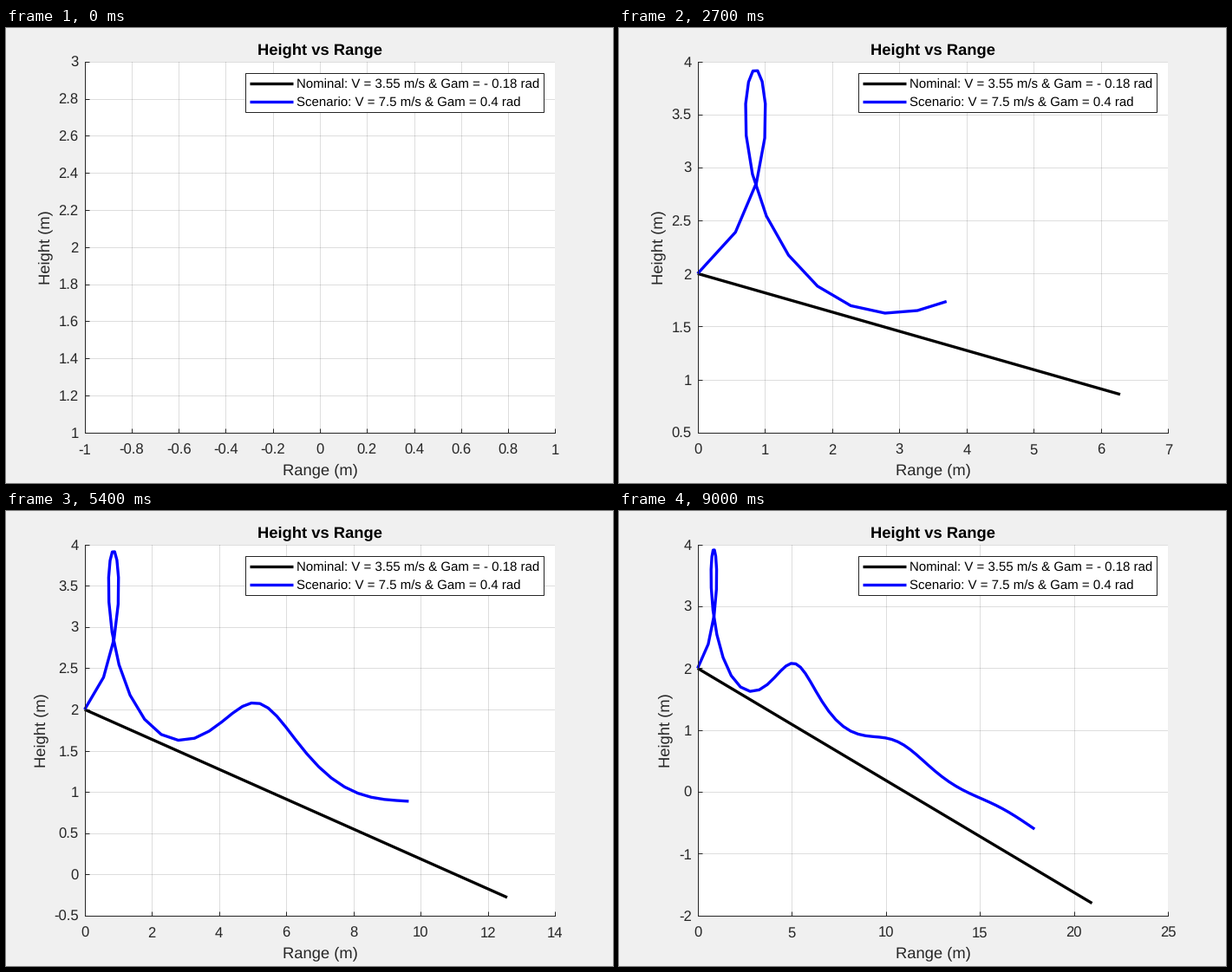
A matplotlib script that plays this animation: 700 px wide and 525 px high, repeating every 9.15 s.

```python
import numpy as np
import matplotlib.pyplot as plt
from matplotlib.animation import FuncAnimation
from matplotlib.lines import Line2D
from matplotlib.patches import Rectangle

W, H, DPI = 700, 525, 120
PX = 72 / DPI                      # points per pixel
INK = "#262626"
FRAMES, STEP_MS, DT = 61, 150, 0.1

plt.rcParams.update({"font.family": "Liberation Sans", "text.hinting": "none"})

# Paper glider flying at its best lift-to-drag ratio
G, RHO, MASS, AREA, ASPECT, OSWALD, CD0 = 9.8, 1.225, 0.003, 0.017, 0.86, 0.9, 0.02
INDUCED = 1 / (np.pi * OSWALD * ASPECT)
CL = np.sqrt(CD0 / INDUCED)
CD = CD0 + INDUCED * CL ** 2
GLIDE = -np.arctan(CD / CL)
TRIM = np.sqrt(2 * MASS * G / (RHO * AREA * (CL * np.cos(GLIDE) - CD * np.sin(GLIDE))))


def motion(state):
    v, gam = state[:2]
    q = 0.5 * RHO * v ** 2 * AREA / MASS
    return np.array([-CD * q - G * np.sin(gam),
                     (CL * q - G * np.cos(gam)) / v,
                     v * np.cos(gam),
                     v * np.sin(gam)])


def fly(v, gam, substeps=20):
    """Range and height at every DT, by fourth-order Runge-Kutta."""
    s, h = np.array([v, gam, 0.0, 2.0]), DT / substeps
    path = [s[2:]]
    for _ in range(FRAMES - 1):
        for _ in range(substeps):
            k1 = motion(s)
            k2 = motion(s + h / 2 * k1)
            k3 = motion(s + h / 2 * k2)
            k4 = motion(s + h * k3)
            s = s + h / 6 * (k1 + 2 * k2 + 2 * k3 + k4)
        path.append(s[2:])
    return np.array(path)


def nice_ticks(lo, hi):
    """Smallest 1-2-5 step that spans the data in at most ten intervals."""
    if hi - lo < 1e-9:
        lo, hi = lo - 1, hi + 1
    for power in range(-3, 3):
        for base in (1, 2, 5):
            step = base * 10.0 ** power
            a = int(np.floor(lo / step + 1e-9))
            b = int(np.ceil(hi / step - 1e-9))
            if b - a <= 10:
                return np.round(np.arange(a, b + 1) * step, 6)


def labels_for(ticks):
    return [f"{t + 0.0:g}" for t in ticks]


def label_width(text, size=10):
    em = sum({".": 0.278, "-": 0.333}.get(c, 0.556) for c in text)
    return em * size / PX


fig = plt.figure(figsize=(W / DPI, H / DPI), dpi=DPI, facecolor="#f0f0f0")
ax = fig.add_axes([90.7 / W, 58.25 / H, 542.6 / W, 427.9 / H])


def put(x, y, text, size, **kw):
    kw = {"ha": "center", "va": "baseline", "color": INK, **kw}
    return fig.text(x / W, 1 - y / H, text, fontsize=size, **kw)


ax.spines[["top", "right"]].set_visible(False)
ax.spines[["left", "bottom"]].set(color=INK, linewidth=PX)
ax.set_axisbelow(True)
ax.grid(color=INK, alpha=0.15, linewidth=PX)
ax.tick_params(direction="in", length=5.4 * PX, width=PX, color=INK,
               labelcolor=INK, labelsize=10)
ax.tick_params(axis="x", pad=25.2 * PX)
ax.tick_params(axis="y", pad=7 * PX)

put(362.25, 30, "Height vs Range", 11, weight="bold", color="black")
put(362.25, 515, "Range (m)", 11)
ylabel = put(50, 253, "Height (m)", 11, rotation=90, rotation_mode="anchor")

runs = [
    ("black", fly(TRIM, GLIDE), "Nominal: V = 3.55 m/s & Gam = - 0.18 rad"),
    ("blue", fly(7.5, 0.4), "Scenario: V = 7.5 m/s & Gam = 0.4 rad"),
]
STROKE = dict(linewidth=2, solid_capstyle="butt", solid_joinstyle="round", snap=False)
lines = [ax.plot([], [], color=c, clip_on=False, **STROKE)[0] for c, _, _ in runs]

# Legend
key = fig.add_axes([0, 0, 1, 1], xlim=(0, W), ylim=(H, 0))
key.axis("off")
key.add_patch(Rectangle((276, 52), 344, 45, facecolor="white",
                        edgecolor=INK, linewidth=PX))
for row, (color, _, name) in enumerate(runs):
    y = 64.5 + 21 * row
    key.add_line(Line2D([281.5, 331.5], [y, y], color=color, **STROKE))
    key.text(335, 70 + 21 * row, name, fontsize=9, color="black",
             ha="left", va="baseline")


def draw(i):
    for line, (_, path, _) in zip(lines, runs):
        line.set_data(*path[:i + 1].T)
    seen = np.vstack([path[:i + 1] for _, path, _ in runs])
    (x0, y0), (x1, y1) = seen.min(axis=0), seen.max(axis=0)
    xt, yt = nice_ticks(x0, x1), nice_ticks(y0, y1)
    names = labels_for(yt)
    ax.set_xticks(xt, labels=labels_for(xt), va="baseline")
    ax.set_yticks(yt, labels=names)
    ax.set_xlim(xt[0], xt[-1])
    ax.set_ylim(yt[0], yt[-1])
    ylabel.set_x((73.5 - max(map(label_width, names))) / W)
    return lines


anim = FuncAnimation(fig, draw, frames=FRAMES, init_func=lambda: draw(0),
                     interval=STEP_MS, repeat=True, repeat_delay=0)
plt.show()
```
